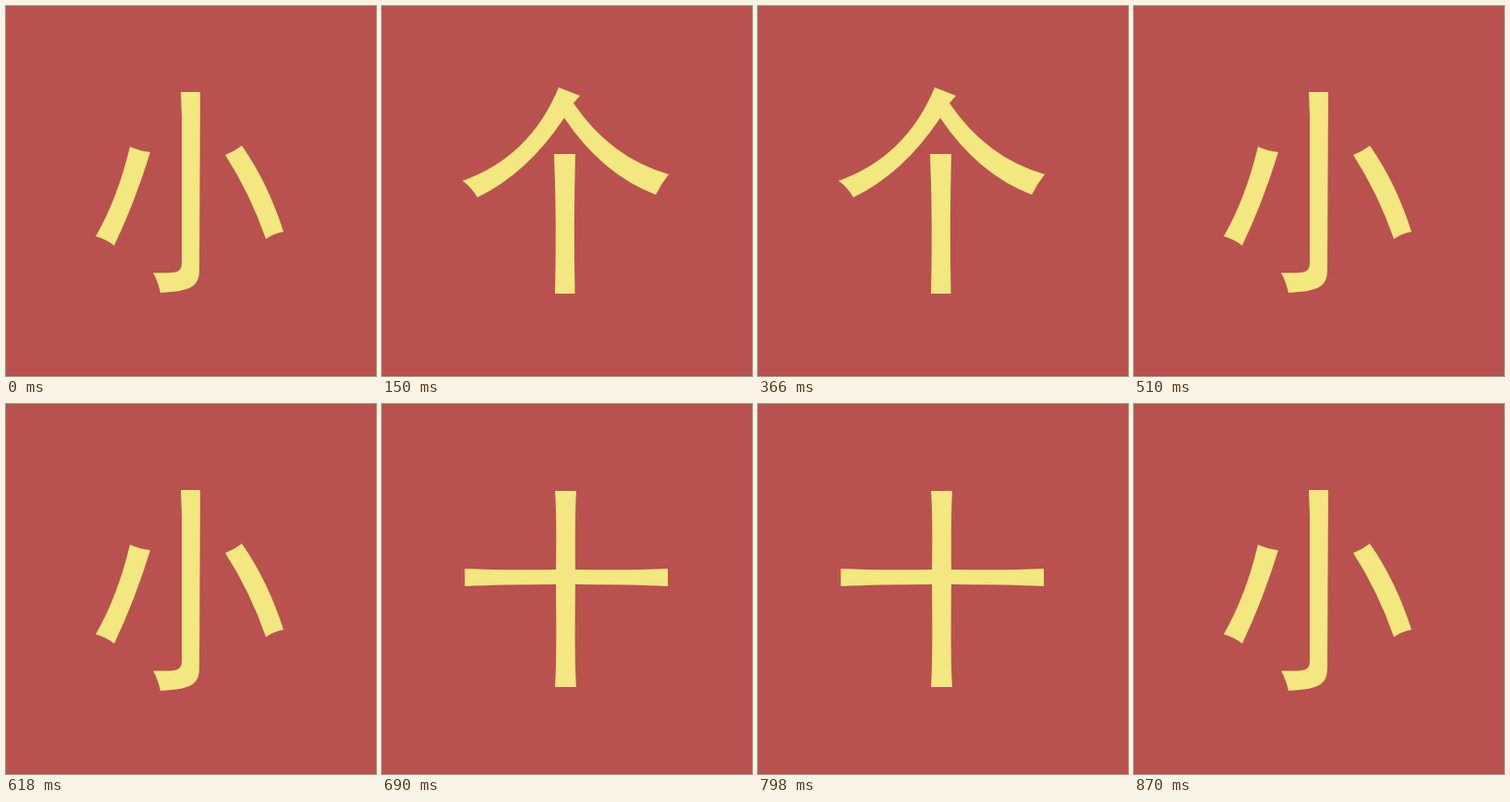
An HTML page without scripts for the animation above (990 ms loop, 400 by 400 pixels).

```html
<!DOCTYPE html>
<html lang="zh">
<head>
<meta charset="utf-8">
<title>小 个 十</title>
<style>
  html, body { margin: 0; width: 100%; height: 100%; overflow: hidden; background: #b9524e; }
  svg { display: block; width: 100%; height: 100%; }
  .glyph { fill: #f3e77f; animation: 990ms step-end infinite; }
  .small { animation-name: small; }
  .piece { animation-name: piece; visibility: hidden; }
  .ten { animation-name: ten; visibility: hidden; }

  /* Hard cuts at 150, 510, 690 and 870 ms */
  @keyframes small {
    0%, 51.5152%, 87.8788% { visibility: visible; }
    15.1515%, 69.697% { visibility: hidden; }
    100% { visibility: visible; }
  }
  @keyframes piece {
    0%, 51.5152%, 100% { visibility: hidden; }
    15.1515% { visibility: visible; }
  }
  @keyframes ten {
    0%, 87.8788%, 100% { visibility: hidden; }
    69.697% { visibility: visible; }
  }
</style>
</head>
<body>
<svg viewBox="0 0 400 400">
  <rect width="400" height="400" fill="#b9524e"/>
  <rect y="399" width="400" height="1" fill="#ab4d4a"/>
  <g class="glyph small" role="img" aria-label="小">
    <path d="M189 93H210L209 284C209 302 203 308 167 310Q164 297 159 288.500C181 288.500 190 290 190 278V120Z"/>
    <path d="M134 152Q145 157 156 158Q139 213 117 259Q108 252 97 249Q121 207 134 152Z"/>
    <path d="M255 151Q283 191 300 244Q289 246 281 252Q264 203 237 161Q247 157 255 151Z"/>
  </g>
  <g class="glyph piece" role="img" aria-label="个">
    <path d="M191 88L214 97L207 105Q247 164 310 182Q302 192 296 204Q238 182 197 121Q157 181 103 207Q97 196 87 189Q160 163 191 88Z"/>
    <path d="M186 160H209Q207 235 208.500 311H187Q189 235 186 160Z"/>
  </g>
  <g class="glyph ten" role="img" aria-label="十">
    <path d="M187 94H210Q208.500 120 209 179Q270 180 309 178V197Q270 195 209 195Q208 280 210 306H187Q189 280 188 195Q130 195 89.500 197V178Q130 180 188 179Q189 120 187 94Z"/>
  </g>
</svg>
</body>
</html>
```
